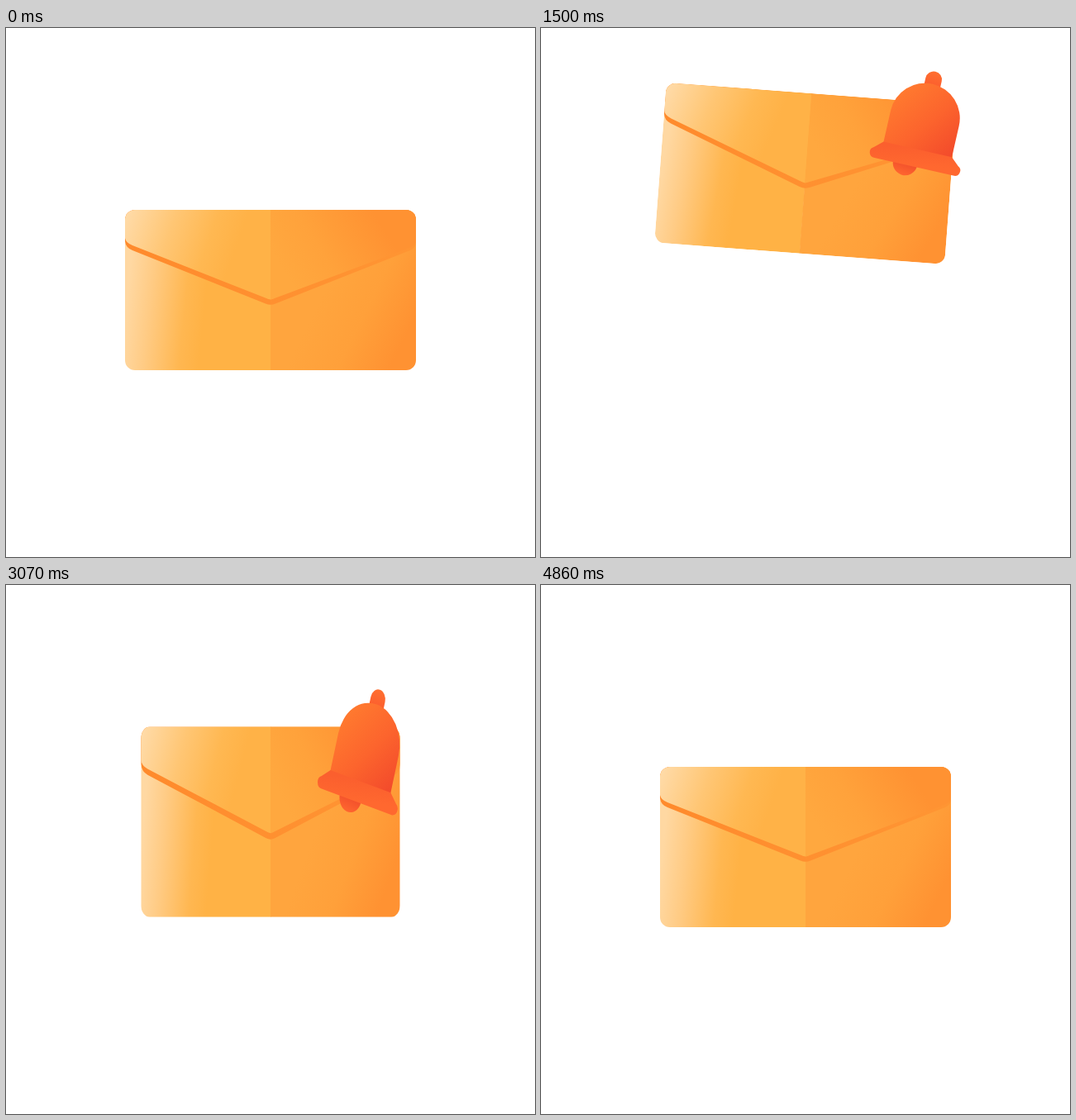
Write an HTML page that moves like this. It is 640 px wide and 640 px high and loops after 5210 ms.

```html
<!DOCTYPE html>
<html lang="en">
<head>
<meta charset="utf-8">
<title>Envelope and bell</title>
<style>
  html, body { margin: 0; width: 100%; height: 100%; overflow: hidden; background: #fff; }
  svg { display: block; width: 100%; height: 100%; }
</style>
</head>
<body>
<svg viewBox="0 0 640 640">
  <defs>
    <clipPath id="card"><rect x="144" y="220" width="352" height="194" rx="12"/></clipPath>
    <linearGradient id="bodyL" gradientUnits="userSpaceOnUse" x1="146" y1="330" x2="240" y2="340">
      <stop offset="0" stop-color="#ffd8a2"/><stop offset=".3" stop-color="#ffcb84"/>
      <stop offset=".75" stop-color="#ffb751"/><stop offset="1" stop-color="#ffb245"/>
    </linearGradient>
    <linearGradient id="bodyR" gradientUnits="userSpaceOnUse" x1="380" y1="330" x2="480" y2="380">
      <stop offset="0" stop-color="#ffa53e"/><stop offset=".5" stop-color="#ffa03a"/><stop offset="1" stop-color="#ff9232"/>
    </linearGradient>
    <linearGradient id="flapL" gradientUnits="userSpaceOnUse" x1="146" y1="230" x2="275" y2="275">
      <stop offset="0" stop-color="#ffdaa6"/><stop offset=".4" stop-color="#ffc674"/>
      <stop offset=".75" stop-color="#ffb852"/><stop offset="1" stop-color="#ffb247"/>
    </linearGradient>
    <linearGradient id="flapR" gradientUnits="userSpaceOnUse" x1="340" y1="300" x2="450" y2="232">
      <stop offset="0" stop-color="#ffa83f"/><stop offset=".4" stop-color="#ffa23b"/><stop offset="1" stop-color="#ff9232"/>
    </linearGradient>
    <linearGradient id="crease" gradientUnits="userSpaceOnUse" x1="144" y1="0" x2="496" y2="0">
      <stop offset="0" stop-color="#ff8a2c"/><stop offset=".5" stop-color="#ff9030"/><stop offset="1" stop-color="#ff9533"/>
    </linearGradient>
    <linearGradient id="dome" gradientUnits="userSpaceOnUse" x1="-34" y1="26" x2="42" y2="84">
      <stop offset="0" stop-color="#ff782f"/><stop offset=".5" stop-color="#fc642d"/><stop offset="1" stop-color="#f34b2b"/>
    </linearGradient>
    <linearGradient id="brim" gradientUnits="userSpaceOnUse" x1="-10" y1="86" x2="-6" y2="109">
      <stop offset="0" stop-color="#fb5f2e"/><stop offset="1" stop-color="#ff682f"/>
    </linearGradient>
    <linearGradient id="knob" gradientUnits="userSpaceOnUse" x1="0" y1="-10" x2="0" y2="14">
      <stop offset="0" stop-color="#ff6f30"/><stop offset="1" stop-color="#fb592d"/>
    </linearGradient>
    <linearGradient id="clapper" gradientUnits="userSpaceOnUse" x1="0" y1="106" x2="0" y2="122">
      <stop offset="0" stop-color="#f2502b"/><stop offset="1" stop-color="#ff662f"/>
    </linearGradient>
  </defs>
  <g id="mail">
    <g clip-path="url(#card)">
      <path fill="url(#bodyL)" d="M144 220H320.5V414H144Z"/>
      <path fill="url(#bodyR)" d="M320 220H496V414H320Z"/>
      <path fill="url(#crease)" d="M144 220V258Q145 266 153 269L314 333.5Q320 336 326 333.5L489 269Q496 266 496 259V220Z"/>
      <path fill="url(#flapL)" d="M144 220V254Q145 260 153 263L315 327Q317 328 320.5 328.5V220Z"/>
      <path fill="url(#flapR)" d="M320 220V328.5Q323 328 325 327L488 266Q496 263 496 257V220Z"/>
    </g>
    <g id="bell">
      <circle id="tongue" cy="107" r="15" fill="url(#clapper)"/>
      <rect x="-10" y="-10" width="20" height="30" rx="10" fill="url(#knob)"/>
      <path fill="url(#dome)" d="M-42.5 89V48A42.5 42.5 0 0 1 42.5 48V89Z"/>
      <path fill="url(#brim)" d="M-42.5 87H42.5L52.5 96A6.6 6.6 0 0 1 49 108.5H-49A6.6 6.6 0 0 1 -52.5 96Z"/>
    </g>
  </g>
</svg>
<script>
const LOOP = 5210, STEP = 1000 / 14, LAST = 68;
const [mail, bell, tongue] = ["mail", "bell", "tongue"].map(id => document.getElementById(id));

// Cubic ease with flat ends; a and b are the handle positions in time.
const ease = (a, b) => u => {
  let lo = 0, hi = 1;
  for (let i = 0; i < 24; i++) {
    const s = (lo + hi) / 2, r = 1 - s;
    if (3 * a * s * r * r + 3 * b * s * s * r + s * s * s < u) lo = s; else hi = s;
  }
  return lo * lo * (3 - 2 * lo);
};
const smooth = u => u * u * (3 - 2 * u);
const launch = ease(.5, .35);
const fall = u => u * u;

// Keys are [step, value, easing into this key].
const tracks = {
  bottom: [[1, 414], [10, 488.5], [20, 273, launch], [38.7, 273], [43.2, 414, fall]],
  sy: [[1, 1], [10, .6], [15, 1, launch], [35.2, 1], [42, 1.24], [47, .73], [54.3, 1]],
  sx: [[33, 1], [42, .87], [46, 1]],
  tilt: [[13.5, 0], [18.5, 16], [24, -11], [30.3, 10.8], [36, -3.8], [39, 0]],
  swing: [[10, 42], [18, 38], [24, -21], [30, 36], [36, -26.5], [42, 18], [48, -13], [52, 4], [55.5, -9], [59, -3]],
  size: [[10.36, 0], [21.4, 1], [60.5, 1], [68.1, 0]],
  lag: [[15, -11], [21, 6], [27, 2], [36, -9], [42, 5], [50, -3], [56, 0]]
};

function at(keys, n) {
  if (n <= keys[0][0]) return keys[0][1];
  for (let i = 1; i < keys.length; i++) {
    const [n0, v0] = keys[i - 1], [n1, v1, fn = smooth] = keys[i];
    if (n < n1) return v0 + (v1 - v0) * fn((n - n0) / (n1 - n0));
  }
  return keys[keys.length - 1][1];
}

function draw(ms) {
  const n = Math.min(LAST, Math.floor((ms % LOOP + 5) / STEP));
  const p = {};
  for (const k in tracks) p[k] = at(tracks[k], n);
  const cy = p.bottom - 97 * p.sy;
  mail.setAttribute("transform",
    `translate(320 ${cy}) rotate(${p.tilt}) scale(${p.sx} ${p.sy}) translate(-320 -317)`);
  bell.setAttribute("transform", `translate(466 192) rotate(${p.swing}) scale(${p.size})`);
  bell.setAttribute("visibility", n < LAST && p.size > 0 ? "visible" : "hidden");
  tongue.setAttribute("transform", `rotate(${p.lag})`);
}

const start = performance.now();
function tick() {
  draw(performance.now() - start);
  requestAnimationFrame(tick);
}
draw(0);
requestAnimationFrame(tick);
</script>
</body>
</html>
```
